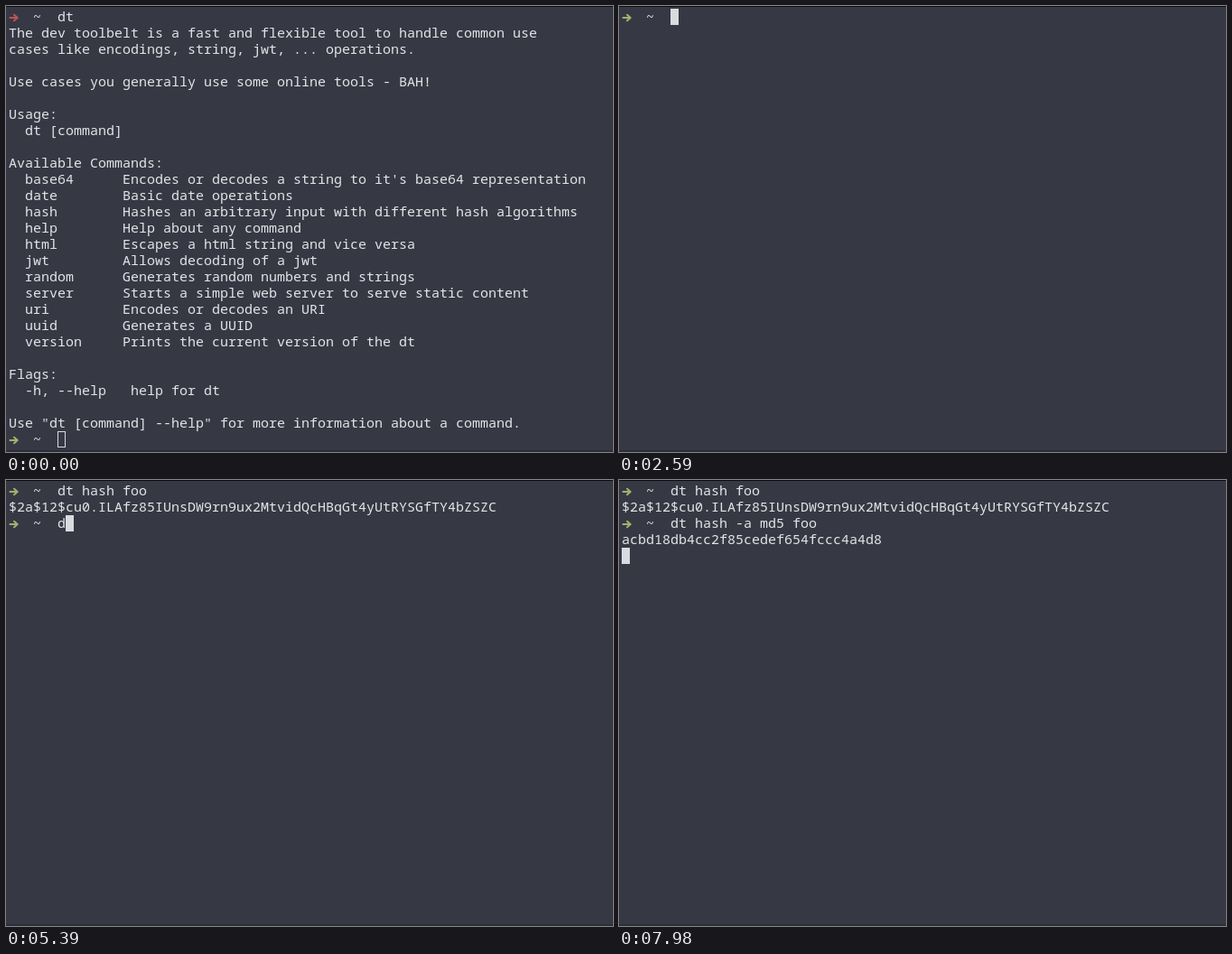
An HTML page for the animation above (8 s loop, 672 by 494 pixels).

```html
<!DOCTYPE html>
<html>
<head>
<meta charset="utf-8">
<style>
  html, body { margin: 0; width: 100%; height: 100%; overflow: hidden; background: #363944; }
  pre, svg { position: absolute; left: 0; top: 0; margin: 0; }
  pre {
    left: 3px; top: 2px; color: #e3e4e6;
    font: 15px/18px "Noto Sans Mono", "DejaVu Sans Mono", monospace;
    font-variant-ligatures: none;
  }
</style>
</head>
<body>
<pre id="screen"></pre>
<svg width="672" height="494">
  <rect width="672" height="1" fill="#0b0c0f"/>
  <rect y="492" width="672" height="2" fill="#2c2f39"/>
  <defs>
    <path id="arrow" d="M4.5 13H11M9 9.7L12.7 13L9 16.3" fill="none" stroke-width="2"
      stroke-linecap="round" stroke-linejoin="round"/>
  </defs>
  <use id="first" href="#arrow"/>
  <use id="second" href="#arrow" stroke="#a3b06c"/>
  <rect id="cursor"/>
</svg>
<script>
const LOOP = 8000, ROW = 18, COL = 9, LEFT = 3;
const PROMPT = '   ~  ';
const HELP = `${PROMPT}dt
The dev toolbelt is a fast and flexible tool to handle common use
cases like encodings, string, jwt, ... operations.

Use cases you generally use some online tools - BAH!

Usage:
  dt [command]

Available Commands:
  base64      Encodes or decodes a string to it's base64 representation
  date        Basic date operations
  hash        Hashes an arbitrary input with different hash algorithms
  help        Help about any command
  html        Escapes a html string and vice versa
  jwt         Allows decoding of a jwt
  random      Generates random numbers and strings
  server      Starts a simple web server to serve static content
  uri         Encodes or decodes an URI
  uuid        Generates a UUID
  version     Prints the current version of the dt

Flags:
  -h, --help   help for dt

Use "dt [command] --help" for more information about a command.
${PROMPT}`;

// Each command lists the time of every key press.
const bcrypt = {
  text: 'dt hash foo',
  keys: [2870, 2940, 3080, 3220, 3360, 3500, 3570, 3710, 3920, 3990, 4130],
  enter: 4270, output: 4620, done: 4690,
  result: '$2a$12$cu0.ILAfz85IUnsDW9rn9ux2MtvidQcHBqGt4yUtRYSGfTY4bZSZC'
};
const md5 = {
  text: 'dt hash -a md5 foo',
  keys: [5390, 5530, 5600, 5740, 5950, 6090, 6160, 6230, 6370, 6440, 6580,
         6720, 6860, 7070, 7210, 7350, 7560, 7770],
  enter: 7910, output: 7980, done: LOOP,
  result: 'acbd18db4cc2f85cedef654fccc4a4d8'
};

const $ = id => document.getElementById(id);
const screen = $('screen'), first = $('first'), second = $('second'), cursor = $('cursor');

function session(cmd, t) {
  let out = PROMPT + cmd.text.slice(0, cmd.keys.filter(k => k <= t).length);
  if (t >= cmd.enter) out += '\n';
  if (t >= cmd.output) out += cmd.result + '\n';
  return out;
}

function terminal(t) {
  if (t < 2590) return HELP;
  return session(bcrypt, t) + (t >= bcrypt.done ? session(md5, t) : '');
}

function set(el, attrs) {
  for (const name in attrs) el.setAttribute(name, attrs[name]);
}

function draw(t) {
  const text = terminal(t), help = t < 2590, hollow = t < 840;
  const lines = text.split('\n'), row = lines.length - 1;
  if (screen.textContent !== text) screen.textContent = text;

  set(first, { stroke: help ? '#c0505a' : '#a3b06c' });
  set(second, {
    y: ROW * (help ? 26 : 2),
    visibility: help || t >= bcrypt.done ? 'visible' : 'hidden'
  });

  const inset = hollow ? 0.5 : 0;
  set(cursor, {
    x: LEFT + COL * lines[row].length + inset,
    y: 3 + ROW * row + inset,
    width: COL - 2 * inset,
    height: ROW - 2 * inset,
    fill: hollow ? 'none' : '#dadbdf',
    stroke: hollow ? '#dadbdf' : 'none'
  });
}

const start = performance.now();
function tick() {
  draw((performance.now() - start) % LOOP);
  requestAnimationFrame(tick);
}
tick();
</script>
</body>
</html>
```
